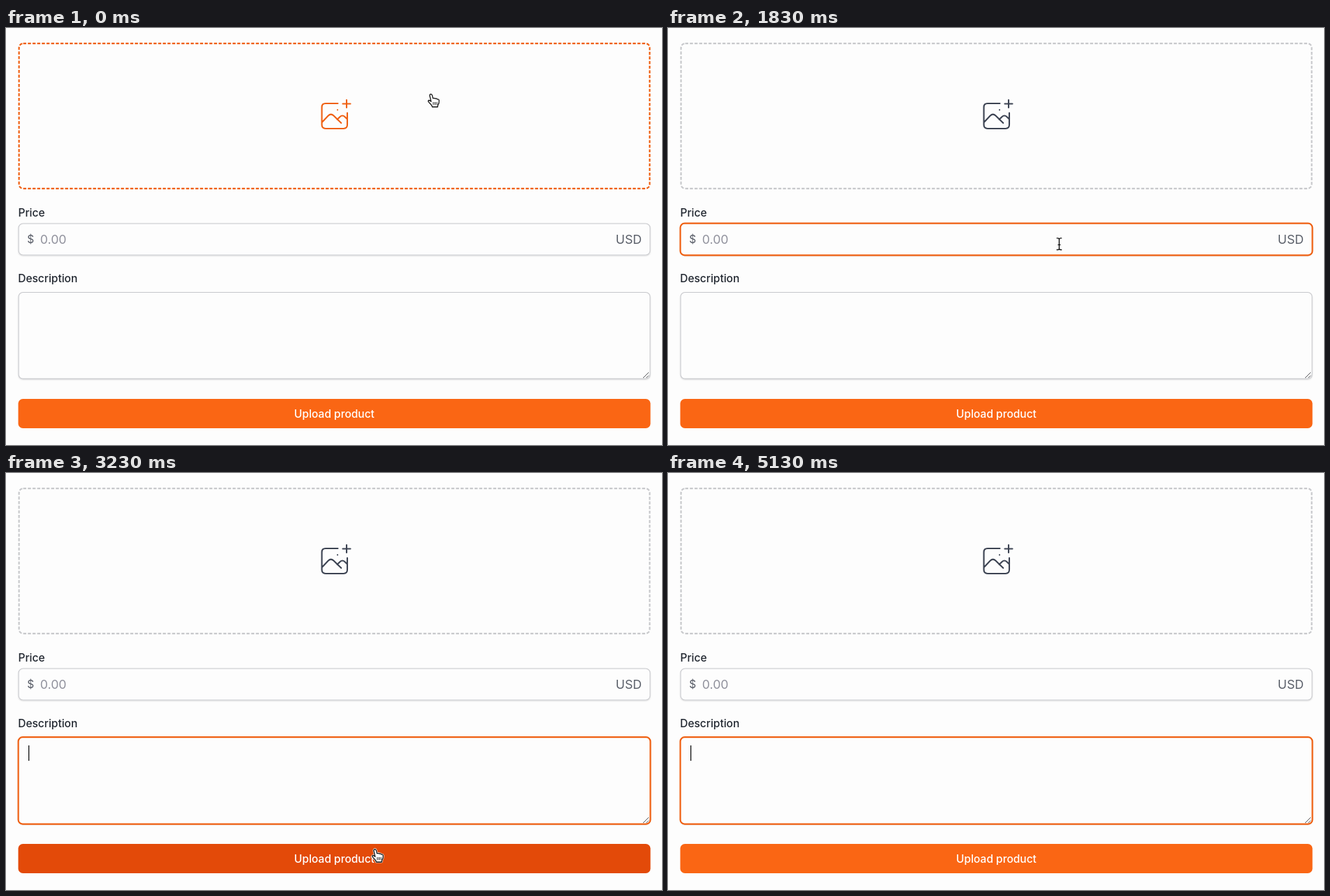
These frames come from a looping animation (938 by 597 pixels, 5.33 s). An HTML page with a canvas:

```html
<!DOCTYPE html>
<html lang="en">
<head>
<meta charset="utf-8">
<title>Upload form</title>
<style>
  html, body { margin: 0; width: 100%; height: 100%; overflow: hidden; background: #fdfdfd; }
  canvas { display: block; width: 938px; height: 597px; }
</style>
</head>
<body>
<canvas id="stage"></canvas>
<script>
const W = 938, H = 597, LOOP = 5330;
const canvas = document.getElementById('stage');
const ctx = canvas.getContext('2d');
const dpr = window.devicePixelRatio || 1;
canvas.width = W * dpr;
canvas.height = H * dpr;

const ORANGE = '#fa6614', DARK = '#e34a09', ACCENT = '#ef6012';
const SMALL = 15.5, LARGE = 17.7;

const zone = { x: 17.5, y: 21, w: 904, h: 210 };
const price = { x: 17.5, y: 279.5, w: 904, h: 46 };
const area = { x: 17.5, y: 378, w: 904, h: 124.7 };
const button = { x: 17.5, y: 531, w: 904, h: 42 };

// Pointer hotspot: time, x, y
const track = [
  [0, 607.5, 95], [270, 642, 108], [550, 642, 108],
  [940, 561.5, 292.5], [1740, 561.5, 292.5],
  [2080, 549.5, 387], [2635, 549.5, 387],
  [3110, 527.5, 541], [3230, 527.5, 539], [3570, 529.5, 532],
  [3700, 530.3, 525], [3800, 530.3, 525], [4130, 948, 212]
];
const FOCUS_PRICE = 1170, CARET_PRICE = 1230;
const FOCUS_AREA = 2100, CARET_AREA = 2130;

const hand = new Path2D('M-1.6 2Q-1.9-.4.2-.4Q1.5-.3 2 1.7L3.1 5.8Q5 4.7 6 6.2Q8 5.4 9 7Q11.5 6.6 11.8 9' +
  'Q12 13 10.2 15L9.6 18H2L1.2 15.8L-3.5 10.6Q-4.3 8.8-2.6 8.5Q-1.3 8.7.4 10.4Z');
const knuckles = new Path2D('M3.5 11V15M6 11V15M8.5 11V15');
const arrow = new Path2D('M0 0V16L3.7 12.6L6.3 18.4L8.8 17.3L6.3 11.7H11.4Z');
const beam = new Path2D('M-3.8-8.3H-2Q0-8.3 0-6.3Q0-8.3 2-8.3H3.8M0-6.5V6.5M-3.8 8.3H-2Q0 8.3 0 6.3Q0 8.3 2 8.3H3.8M-2 1.2H2');
const icon = new Path2D('M474.5 108H457Q451.6 108 451.6 113.4V138.6Q451.6 144 457 144H482.6Q488 144 488 138.6V121.5' +
  'M487 103V114M481.5 108.5H492.5M474 117.2H474.1' +
  'M451.6 135.2L460.8 125.6Q464.6 121.8 468.5 125.6L479.3 136' +
  'M473.6 131L477.4 127.2Q481 123.8 484.6 127.2L488 130.5');

const inside = (b, x, y) => x >= b.x && x <= b.x + b.w && y >= b.y && y <= b.y + b.h;

function pointerAt(t) {
  const i = track.findIndex(k => k[0] > t);
  if (i < 0) return track[track.length - 1].slice(1);
  const [t0, x0, y0] = track[i - 1], [t1, x1, y1] = track[i];
  const p = (t - t0) / (t1 - t0);
  const e = i === track.length - 1 ? p * p * p : p * p * (3 - 2 * p);
  return [x0 + (x1 - x0) * e, y0 + (y1 - y0) * e];
}

function rounded(x, y, w, h, r) {
  ctx.beginPath();
  ctx.roundRect(x, y, w, h, r);
}

function text(str, x, y, size, color, weight = 400, align = 'left') {
  ctx.font = `${weight} ${size}px Inter, "Open Sans", sans-serif`;
  ctx.textAlign = align;
  ctx.fillStyle = color;
  ctx.fillText(str, x, y);
}

function drawZone(hover) {
  const r = 6, w = zone.w - 2.2, h = zone.h - 2.2;
  const length = 2 * (w + h) - (8 - 2 * Math.PI) * r;
  const period = length / Math.floor(length / 6.64);
  rounded(zone.x + 1.1, zone.y + 1.1, w, h, r);
  ctx.lineWidth = 2.2;
  ctx.strokeStyle = hover ? ACCENT : '#c8c9cc';
  ctx.setLineDash([4.43, period - 4.43]);
  ctx.stroke();
  ctx.setLineDash([]);

  ctx.lineCap = ctx.lineJoin = 'round';
  ctx.strokeStyle = hover ? ACCENT : '#3c4352';
  ctx.lineWidth = 2.1;
  ctx.stroke(icon);
  ctx.lineCap = 'butt';
}

function drawField(b, focused) {
  ctx.save();
  ctx.shadowColor = 'rgba(0,0,0,.14)';
  ctx.shadowBlur = 2 * dpr;
  ctx.shadowOffsetY = dpr;
  rounded(b.x, b.y, b.w, b.h, 6.6);
  ctx.fillStyle = '#fdfdfd';
  ctx.fill();
  ctx.restore();
  const inset = focused ? 0.1 : 0.55;
  rounded(b.x + inset, b.y + inset, b.w - 2 * inset, b.h - 2 * inset, 6.2);
  ctx.lineWidth = focused ? 2.2 : 1.1;
  ctx.strokeStyle = focused ? ACCENT : '#c6c7cb';
  ctx.stroke();
}

function drawGrip() {
  ctx.beginPath();
  ctx.moveTo(911, 501); ctx.lineTo(919, 493);
  ctx.moveTo(915.5, 501); ctx.lineTo(919, 497.5);
  ctx.strokeStyle = '#55565a';
  ctx.lineWidth = 1;
  ctx.stroke();
}

function drawCaret(x, y, since) {
  if (since < 0 || since % 1000 >= 500) return;
  ctx.fillStyle = '#111';
  ctx.fillRect(x, y, 1.3, 22);
}

function drawPointer(x, y) {
  ctx.save();
  ctx.translate(x, y);
  ctx.lineJoin = 'round';
  const line = (path, width, color) => {
    ctx.lineWidth = width;
    ctx.strokeStyle = color;
    ctx.stroke(path);
  };
  if (inside(zone, x, y) || inside(button, x, y)) {
    line(hand, 2.6, '#fff');
    ctx.fillStyle = '#fff';
    ctx.fill(hand);
    line(hand, 1.3, '#111');
    line(knuckles, 1, '#111');
  } else if (inside(price, x, y) || inside(area, x, y)) {
    line(beam, 3, '#fff');
    line(beam, 1.4, '#111');
  } else {
    line(arrow, 2.4, '#fff');
    ctx.fillStyle = '#000';
    ctx.fill(arrow);
  }
  ctx.restore();
}

function draw(t) {
  const [x, y] = pointerAt(t);
  ctx.setTransform(dpr, 0, 0, dpr, 0, 0);
  ctx.fillStyle = '#fdfdfd';
  ctx.fillRect(0, 0, W, H);

  drawZone(inside(zone, x, y));

  text('Price', 17.5, 269.7, SMALL, '#20262f', 500);
  drawField(price, t >= FOCUS_PRICE && t < FOCUS_AREA);
  text('$', 30.3, 308, SMALL, '#555a65');
  text('0.00', 48.8, 309.2, LARGE, '#90919c');
  text('USD', 909, 309.2, LARGE, '#5a5f69', 400, 'right');
  if (t < FOCUS_AREA) drawCaret(49, 292, t - CARET_PRICE);

  text('Description', 17.2, 363.9, SMALL, '#20262f', 500);
  drawField(area, t >= FOCUS_AREA);
  drawGrip();
  drawCaret(32, 390, t - CARET_AREA);

  rounded(button.x, button.y, button.w, button.h, 6.6);
  ctx.fillStyle = inside(button, x, y) ? DARK : ORANGE;
  ctx.fill();
  text('Upload product', 469.5, 557.6, SMALL, '#fff', 500, 'center');

  if (t < 4130) drawPointer(x, y);
}

function frame() {
  draw(performance.now() % LOOP);
  requestAnimationFrame(frame);
}
frame();
</script>
</body>
</html>
```
